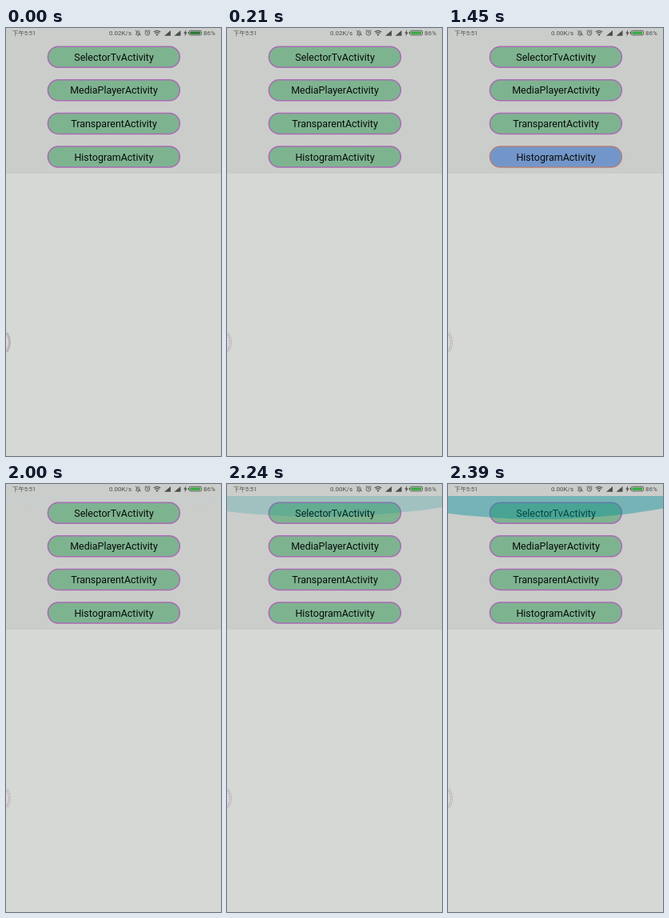
Recreate the animation shown at these times as an HTML page. Size 269 by 535 pixels, loop 2470 ms.

```html
<!DOCTYPE html>
<html lang="zh">
<head>
<meta charset="utf-8">
<style>
html, body { margin: 0; width: 100%; height: 100%; overflow: hidden; background: #d6d8d5; }
svg { display: block; width: 269px; height: 535px; font-family: Roboto, "Noto Sans CJK SC", "Noto Sans CJK", sans-serif; }
.status { font-size: 8px; fill: #4c4e4c; }
.icon { fill: none; stroke: #555755; stroke-width: .9; }
.solid { fill: #4c4e4c; }
.button rect { fill: #7eb390; stroke: #a86cb2; stroke-width: 1.5; }
.button text { font-size: 12.5px; text-anchor: middle; fill: #080c09; }
.pressed rect { fill: #7396ca; stroke: #b18279; }
</style>
</head>
<body>
<svg viewBox="0 0 269 535">
  <defs><clipPath id="content"><rect y="15" width="269" height="167"/></clipPath></defs>
  <rect width="269" height="535" fill="#d6d8d5"/>
  <rect width="269" height="182" fill="#cbcdcb"/>

  <g class="status">
    <text x="8" y="9.2" font-size="7.4">下午5:51</text>
    <text id="speed" x="129" y="9.2"></text>
    <text x="247" y="9.2">86%</text>
  </g>
  <g class="icon">
    <path d="M162.5 8.2H168L167 6.8V5Q165.2 1.6 163.4 5V6.8ZM164.5 9.8H166M161.8 3L168.8 9.2"/>
    <circle cx="177" cy="6.3" r="2.8"/>
    <path d="M177 4.6V6.5H178.4M173.6 3.7L175.3 2.3M180.4 3.7L178.7 2.3"/>
    <path d="M184.8 5Q189 1.6 193.2 5M186.3 6.7Q189 4.5 191.7 6.7" stroke-width="1.3"/>
    <rect x="229" y="3.3" width="15.6" height="5.6" rx="1.6"/>
  </g>
  <g class="solid">
    <path d="M187.4 8L189 10L190.6 8Q189 6.8 187.4 8Z"/>
    <path d="M198 9.8L206 3V9.8ZM210.5 9.8L218.5 3V9.8Z"/>
    <path d="M225.4 2L222.3 6.8H224.2L223.4 10.5L226.7 5.4H224.7Z"/>
    <rect x="227.8" y="5" width="1.2" height="2.2"/>
  </g>
  <rect id="charge" x="230.3" y="4.4" width="13" height="3.4" rx=".8"/>

  <g id="list"></g>
  <g clip-path="url(#content)"><ellipse id="glow" cx="115" rx="403" fill="#009098"/></g>

  <g fill="none">
    <path d="M1 381Q8 393 1 405" stroke="#b9b3b9" stroke-width="3"/>
    <path id="wear" d="M1 381Q8 393 1 405" stroke="#d6d5d6" stroke-width="1.6" stroke-dasharray="3 .7"/>
  </g>
</svg>
<script>
const LOOP = 2470;
const PULL_STEPS = [2000, 2090, 2160, 2240, 2330, 2390];
const $ = id => document.getElementById(id);
const set = (el, attrs) => Object.entries(attrs).forEach(([k, v]) => el.setAttribute(k, v));

$("list").innerHTML = ["SelectorTv", "MediaPlayer", "Transparent", "Histogram"].map((name, i) => {
  const y = 36.2 + i * 41.6;
  return `<g class="button"><rect x="52.4" y="${y - 13}" width="165" height="26" rx="13"/>
    <text x="135" y="${y + 4.6}">${name}Activity</text></g>`;
}).join("");
const last = $("list").lastElementChild;

function draw(t) {
  $("speed").textContent = t < 1220 ? "0.02K/s" : "0.00K/s";
  set($("charge"), { fill: t < 70 ? "#24752d" : "#35a83d" });
  set($("wear"), { opacity: t < 70 ? 0 : t < 140 ? .5 : t < 210 ? .75 : 1 });
  last.classList.toggle("pressed", t >= 1220 && t < 2000);

  // The overscroll glow deepens and darkens as the list is pulled.
  const step = PULL_STEPS.filter(s => s <= t).pop();
  const pull = step ? (step - 1950) / 440 : 0;
  const depth = 29 * pull ** .27;
  const ry = 177 * depth / 29;
  set($("glow"), { ry, cy: 15 + depth - ry, opacity: .42 * pull ** 1.7 });
}

const start = performance.now();
function tick() {
  draw((performance.now() - start) % LOOP);
  requestAnimationFrame(tick);
}
tick();
</script>
</body>
</html>
```
